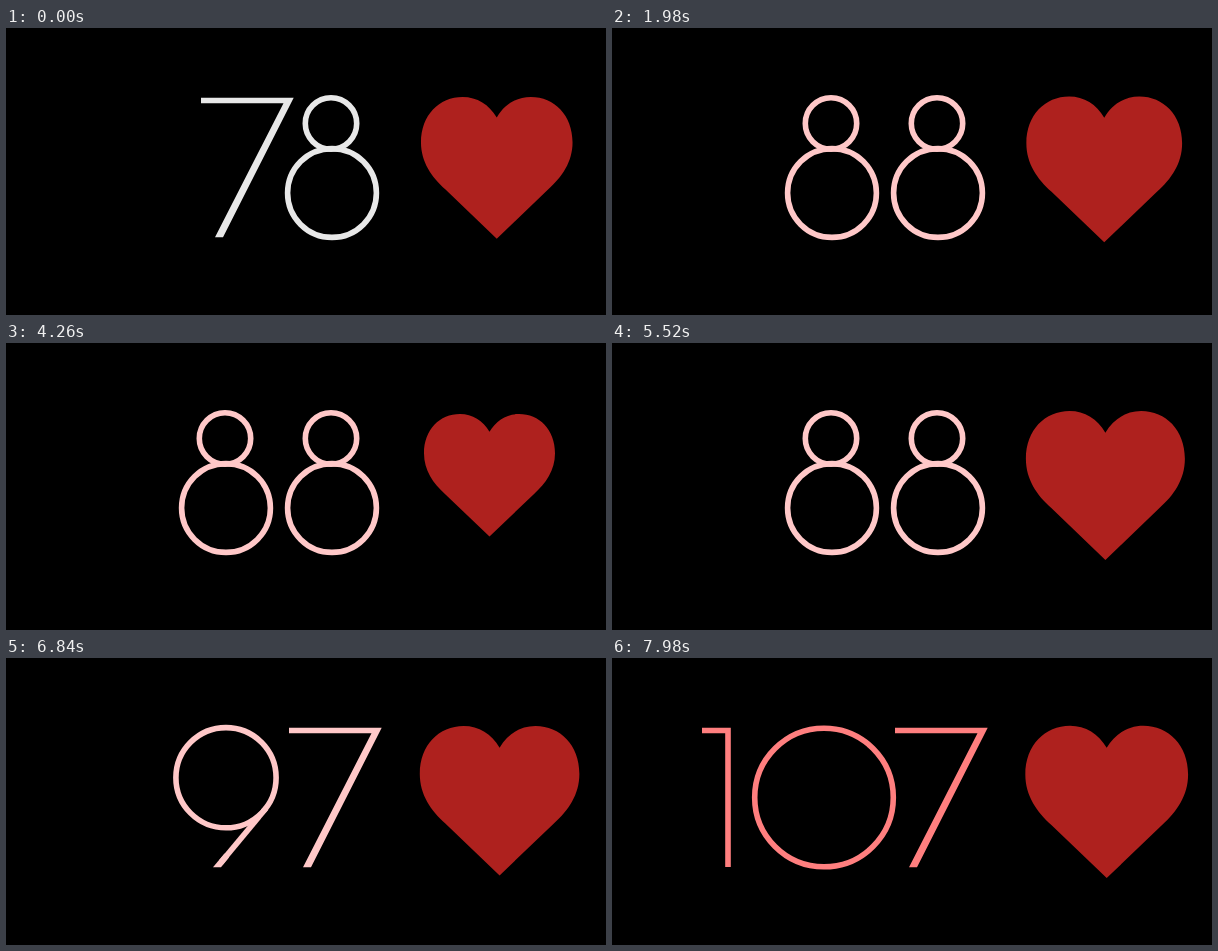
Recreate the animation shown at these times as an HTML page. Size 600 px wide and 287 px high, loop 8 s.

```html
<!DOCTYPE html>
<html lang="en">
<head>
<meta charset="utf-8">
<title>Heart rate</title>
<style>
  html, body { margin: 0; width: 100%; height: 100%; overflow: hidden; background: #000; }
  svg { display: block; width: 600px; height: 287px; }
</style>
</head>
<body>
<svg viewBox="0 0 600 287">
  <defs>
    <g id="d0"><circle cx="72" cy="139.5" r="69.3"/></g>
    <g id="d1"><path d="M0 72.5H26V209"/></g>
    <g id="d7"><path d="M0 69.7H92.7L22 209.2H14L82.5 75.3H0Z" fill="currentColor" stroke="none"/></g>
    <g id="d8"><circle cx="46" cy="95.5" r="25.7"/><circle cx="47" cy="165" r="44.4"/></g>
    <g id="d9">
      <circle cx="53" cy="119.7" r="50.1"/>
      <path d="M93.2 150L48 204.4" />
      <path d="M40 209.2H48L56 199.5L51.5 195.4Z" fill="currentColor" stroke="none"/>
    </g>
    <g id="d6"><use href="#d9" transform="rotate(180 53 139.5)"/></g>
  </defs>
  <g id="digits" fill="none" stroke="currentColor" stroke-width="5.6"></g>
  <path id="heart" fill="#ae211e" d="M0 13.6C-5 5-13 0-22.5 0C-38 0-50 12-50 30C-50 43-43 53-34 61L0 93.6L34 61C43 53 50 43 50 30C50 12 38 0 22.5 0C13 0 5 5 0 13.6Z"/>
</svg>
<script>
const LOOP = 8000, STEP = 60;
const REST = 131, PEAK = 171.5;
const PALE = '#ffc8c8', CORAL = '#ff7f7f';

// start, value, colour, left edge of each digit
const readings = [
  [0, '78', '#e8e8e8', [195, 279]],
  [1140, '88', PALE, [173, 279]],
  [5880, '96', PALE, [156, 268]],
  [6540, '97', PALE, [167, 283]],
  [7200, '106', CORAL, [58, 108, 268]],
  [7800, '107', CORAL, [90, 140, 283]]
];

// start, peak and end of each beat
const beats = [
  [-100, 98, 260], [430, 620, 840], [1080, 1162, 1440], [1690, 1890, 2100],
  [2380, 2590, 2800], [3020, 3220, 3440], [3580, 3790, 4020], [4640, 4800, 4980],
  [5240, 5430, 5670], [5840, 6060, 6300], [6520, 6771, 6960], [7160, 7370, 7600],
  [7800, 8060, 8260]
];

const digits = document.getElementById('digits');
const heart = document.getElementById('heart');
const ease = p => (1 - Math.cos(Math.PI * p)) / 2;

const groups = readings.map(([, value, color, xs]) => {
  const g = document.createElementNS('http://www.w3.org/2000/svg', 'g');
  g.style.color = color;
  g.innerHTML = [...value].map((d, i) => `<use href="#d${d}" x="${xs[i]}"/>`).join('');
  digits.append(g);
  return g;
});

function pulse(t) {
  const beat = beats.find(([start, , end]) => t >= start && t < end);
  if (!beat) return 0;
  const [start, peak, end] = beat;
  return ease(t < peak ? (t - start) / (peak - start) : (end - t) / (end - peak));
}

function draw(now) {
  const t = Math.floor(now % LOOP / STEP) * STEP;
  const current = readings.findLastIndex(r => r[0] <= t);
  groups.forEach((g, i) => g.setAttribute('visibility', i === current ? 'visible' : 'hidden'));

  const grow = (PEAK - REST) * pulse(t), width = REST + grow;
  const x = 418 - 0.147 * grow + width / 2, y = 71 - 0.103 * grow;
  heart.setAttribute('transform', `translate(${x} ${y}) scale(${width / 100})`);
}

const begin = performance.now();
function tick() {
  draw(performance.now() - begin);
  requestAnimationFrame(tick);
}
tick();
</script>
</body>
</html>
```
